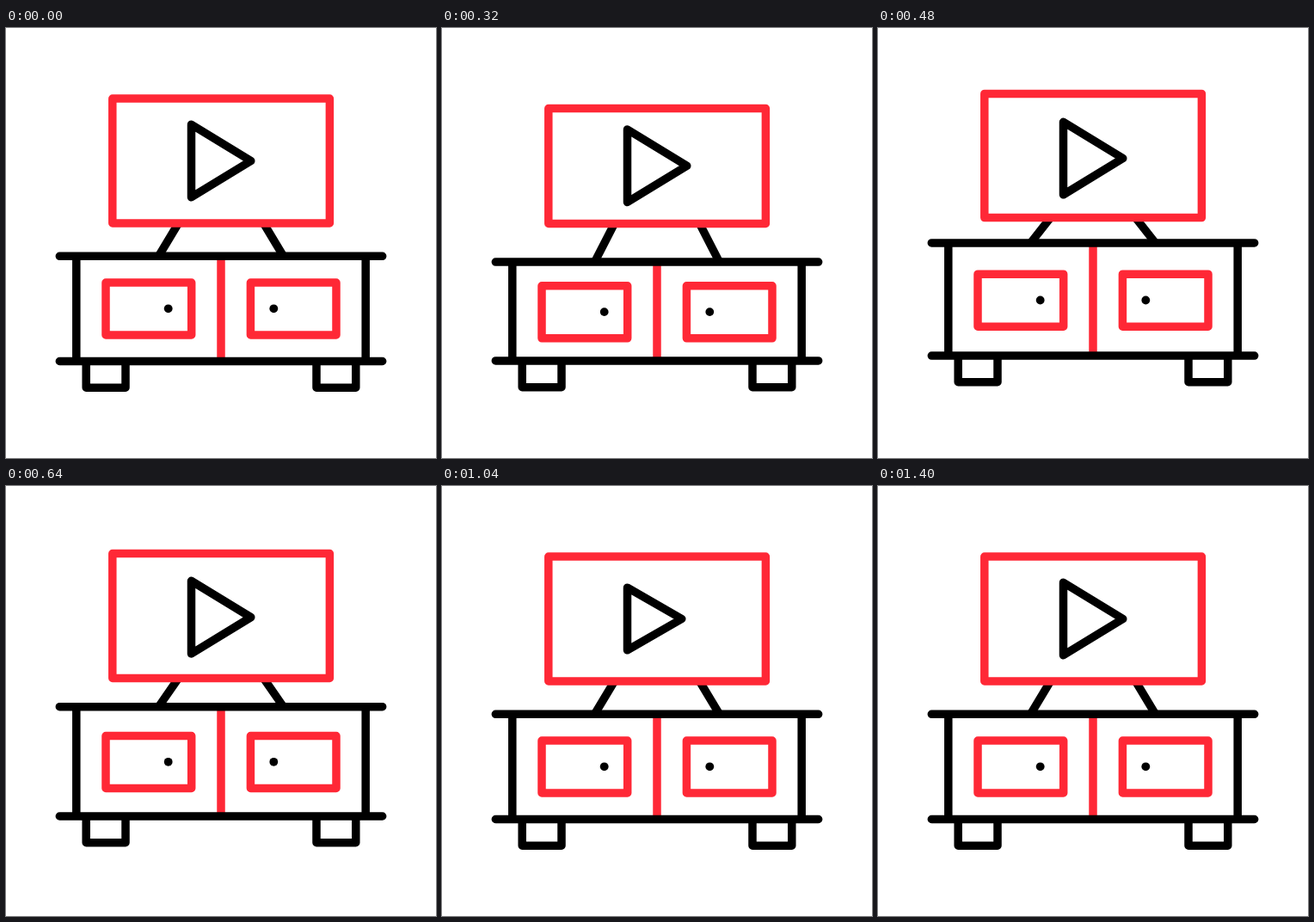
These frames come from a looping animation (500 px wide and 500 px high, 1.48 s). An HTML page:

```html
<!DOCTYPE html>
<html lang="en">
<head>
<meta charset="utf-8">
<title>TV stand</title>
<style>
  html, body { margin: 0; width: 100%; height: 100%; overflow: hidden; background: #fff; }
  svg { display: block; width: 100vw; height: 100vh; }
  path { fill: none; stroke: #000; stroke-width: 9.5; stroke-linejoin: round; stroke-linecap: round; }
  .red { stroke: #ff2836; }
  .butt { stroke-linecap: butt; }
</style>
</head>
<body>
<svg viewBox="0 0 500 500">
  <path id="stand" class="butt"/>
  <path id="screen" class="red"/>
  <path id="play"/>
  <path id="divider" class="red butt"/>
  <path id="doors" class="red"/>
  <g id="knobs"><circle cx="188.7" cy="326.3" r="4.9"/><circle cx="311.3" cy="326.3" r="4.9"/></g>
  <path id="cabinet"/>
</svg>
<script>
const LOOP = 1480, STEP = 40;
const el = id => document.getElementById(id);
const draw = (id, d) => el(id).setAttribute('d', d);
const rect = (x1, y1, x2, y2) => `M${x1} ${y1}H${x2}V${y2}H${x1}Z`;

// Eased value through [time, value] keys, held outside them
function track(t, keys) {
  if (t <= keys[0][0]) return keys[0][1];
  for (let i = 1; i < keys.length; i++) {
    const [t0, a] = keys[i - 1], [t1, b] = keys[i];
    if (t < t1) {
      const p = (t - t0) / (t1 - t0);
      return a + (b - a) * p * p * (3 - 2 * p);
    }
  }
  return keys[keys.length - 1][1];
}

function render(t) {
  // Squash down, stretch up, settle
  const hop = (rest, squash, stretch) =>
    track(t, [[80, rest], [280, squash], [520, stretch], [760, rest]]);

  const top = hop(82, 95, 75);
  const bottom = hop(227, 228, 220);
  const shelf = hop(265.3, 274, 248);
  const base = hop(387.5, 387.5, 380.5);
  const door = hop(0, 5, -11);
  const playY = hop(154.5, 161, 150.8);
  const shrink = track(t, [[920, 0], [1160, 12], [1400, 0]]);

  draw('stand', `M200.5 ${bottom}L177.5 ${shelf}M299.5 ${bottom}L322.5 ${shelf}`);
  draw('screen', rect(123.8, top, 376.4, bottom));
  const half = 42.3 - shrink;
  draw('play', `M215.5 ${playY - half}L${284.8 - shrink} ${playY}L215.5 ${playY + half}Z`);
  draw('divider', `M250 ${shelf}V${base}`);
  draw('doors', rect(116, 296 + door, 215.7, 357 + door) + rect(284.4, 296 + door, 384, 357 + door));
  el('knobs').setAttribute('transform', `translate(0 ${door})`);
  draw('cabinet',
    `M62.3 ${shelf}H437.7M62.3 ${base}H437.7` +
    `M81.8 ${shelf}V${base}M418.2 ${shelf}V${base}` +
    rect(93.2, base, 139, base + 30.7) + rect(361, base, 406.8, base + 30.7));
}

const start = performance.now();
function tick() {
  const t = (performance.now() - start) % LOOP;
  render(Math.floor(t / STEP) * STEP);
  requestAnimationFrame(tick);
}
tick();
</script>
</body>
</html>
```
